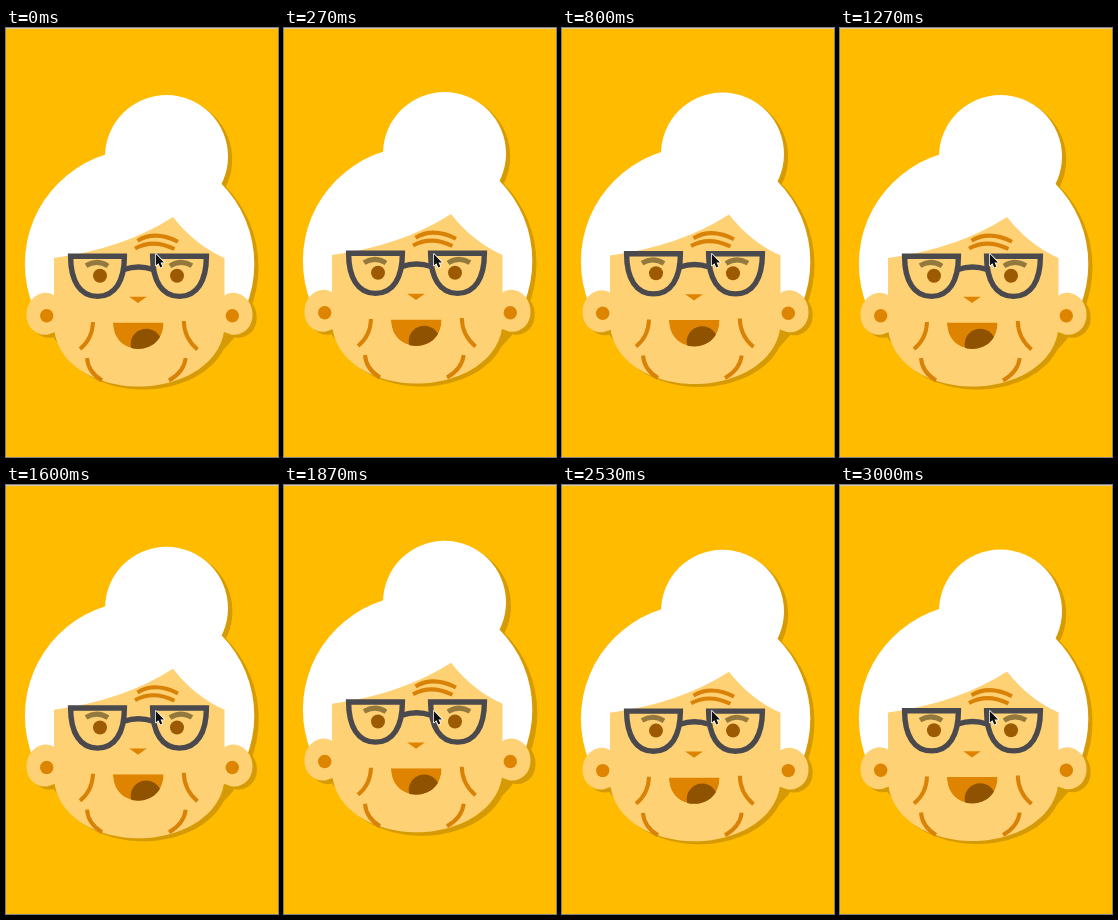
Animation, 272 px wide and 429 px high, one loop 3.07 s. Source, as an HTML page with a canvas:

```html
<!DOCTYPE html>
<html lang="en">
<head>
<meta charset="utf-8">
<title>Bouncing grandma</title>
<style>
html, body { margin: 0; width: 100%; height: 100%; overflow: hidden; background: #ffbb00; }
canvas { display: block; width: 272px; height: 429px; }
</style>
</head>
<body>
<canvas id="stage" width="272" height="429"></canvas>
<script>
const canvas = document.getElementById('stage');
const ctx = canvas.getContext('2d');
const scale = window.devicePixelRatio || 1;
canvas.width = 272 * scale;
canvas.height = 429 * scale;

const LOOP = 3070, STEPS = 46, STEP = LOOP / STEPS;
const SKIN = '#ffd175', LINE = '#d98208', FRAME = '#4a494e', SHADE = '#d69b04';

// Slow drift of the head between jumps: time, offset
const DRIFT = [[0, 0], [267, -3], [800, -2.5], [1000, -2], [1110, 0], [1580, 0],
  [1900, -3], [2200, -2], [3000, -2.5], [LOOP, -2.5]];

function drift(t) {
  const i = DRIFT.findIndex(k => k[0] > t);
  const [t0, a] = DRIFT[i - 1], [t1, b] = DRIFT[i];
  const p = (t - t0) / (t1 - t0);
  return a + (b - a) * p * p * (3 - 2 * p);
}

function jump(t, start, end) {
  const p = (t - start) / (end - start);
  return p > 0 && p < 1 ? -21 * 4 * p * (1 - p) : 0;
}

function circle(x, y, r, color) {
  ctx.fillStyle = color;
  ctx.beginPath();
  ctx.arc(x, y, r, 0, Math.PI * 2);
  ctx.fill();
}

function fill(d, color) {
  ctx.fillStyle = color;
  ctx.fill(new Path2D(d));
}

function stroke(d, color, width) {
  ctx.strokeStyle = color;
  ctx.lineWidth = width;
  ctx.stroke(new Path2D(d));
}

const JAW = 'V296 C218.5 335 176 358.5 133 358.5 C89 358.5 48 335 48 296 Z';
const FACE = 'M48 230 Q118 220.5 167 189 Q189 217 218.5 230 ' + JAW;
const EAR = 'M49 268 C38 259.5 20.5 269 20.5 287 C20.5 300 31 308.5 42 306.5 L49 304 Z';

function hair(color) {
  circle(160.5, 128.5, 61.5, color);
  circle(133.6, 236, 114.7, color);
}

function ears(color) {
  fill(EAR, color);
  ctx.save();
  ctx.translate(267, 0);
  ctx.scale(-1, 1);
  fill(EAR, color);
  ctx.restore();
}

function shadow(offset) {
  ctx.save();
  ctx.translate(offset, offset * 0.7);
  hair(SHADE);
  ears(SHADE);
  fill('M48 230 H218.5 ' + JAW, SHADE);
  ctx.restore();
}

function glasses() {
  for (const x of [0, 82]) {
    ctx.save();
    ctx.translate(x, 0);
    stroke('M64.6 228.3 H118.4 C118.4 253 109 268.4 91.5 268.4 C74 268.4 64.6 253 64.6 228.3 Z', FRAME, 5.4);
    ctx.restore();
  }
  stroke('M118 241.5 Q132.5 236.5 147 241.5', FRAME, 5.4);
}

function mouth() {
  const shape = new Path2D('M107 294.6 H157.6 C157.6 311 146.5 321 132.3 321 C118 321 107 311 107 294.6 Z');
  ctx.save();
  ctx.clip(shape);
  ctx.fillStyle = '#df8400';
  ctx.fill(shape);
  circle(140.2, 316.3, 15.5, '#8f5300');
  ctx.restore();
}

function head() {
  // Cut the head circle away below the ears
  ctx.save();
  ctx.beginPath();
  ctx.rect(0, 0, 272, 290);
  ctx.clip();
  hair('#fff');
  ctx.restore();

  ears(SKIN);
  fill(FACE, SKIN);
  circle(40.7, 287.8, 6.7, '#dd8400');
  circle(226.3, 287.8, 6.7, '#dd8400');

  stroke('M131.5 212.8 Q149 202 172 213.8 M129 220.5 Q147 210.5 168.5 221', LINE, 4);
  stroke('M80 237.6 Q91 231 102 238 M164 238 Q175 231 186 237.6', '#94793f', 5);
  circle(94, 247.8, 7, '#9c5a02');
  circle(171, 247.8, 7, '#9c5a02');
  glasses();

  fill('M123.2 268.8 H140.8 L132 275 Z', '#df8400');
  mouth();
  stroke('M87 294 Q86.5 311 74 321 M177.8 293 Q178 310 191.5 321.5', LINE, 4);
  stroke('M81 330 Q82 344 96 352.5 M179.7 330 Q178 344 163 352.5', LINE, 4);
}

function pointer() {
  ctx.lineJoin = 'round';
  const arrow = 'M149.8 226 V237.5 L152.4 235.2 L154.3 239.4 L156.3 238.5 L154.5 234.4 H158 Z';
  stroke(arrow, '#fff', 1.6);
  fill(arrow, '#111');
  ctx.lineJoin = 'miter';
}

function draw(time) {
  const step = Math.floor((time % LOOP + 8) / STEP) % STEPS;
  const t = step * STEP;
  const y = drift(t) + jump(t, 0, 260) + jump(t, 1580, 1905);

  ctx.setTransform(scale, 0, 0, scale, 0, 0);
  ctx.fillStyle = '#ffbb00';
  ctx.fillRect(0, 0, 272, 429);
  ctx.fillStyle = '#dccba0';
  ctx.fillRect(0, 0, 272, 1);

  ctx.save();
  ctx.translate(0, y);
  shadow(4.2 + Math.max(0, -y - 3) * 0.1);
  head();
  ctx.restore();
  pointer();
}

const begin = performance.now();
function loop() {
  draw(performance.now() - begin);
  requestAnimationFrame(loop);
}
loop();
</script>
</body>
</html>
```
